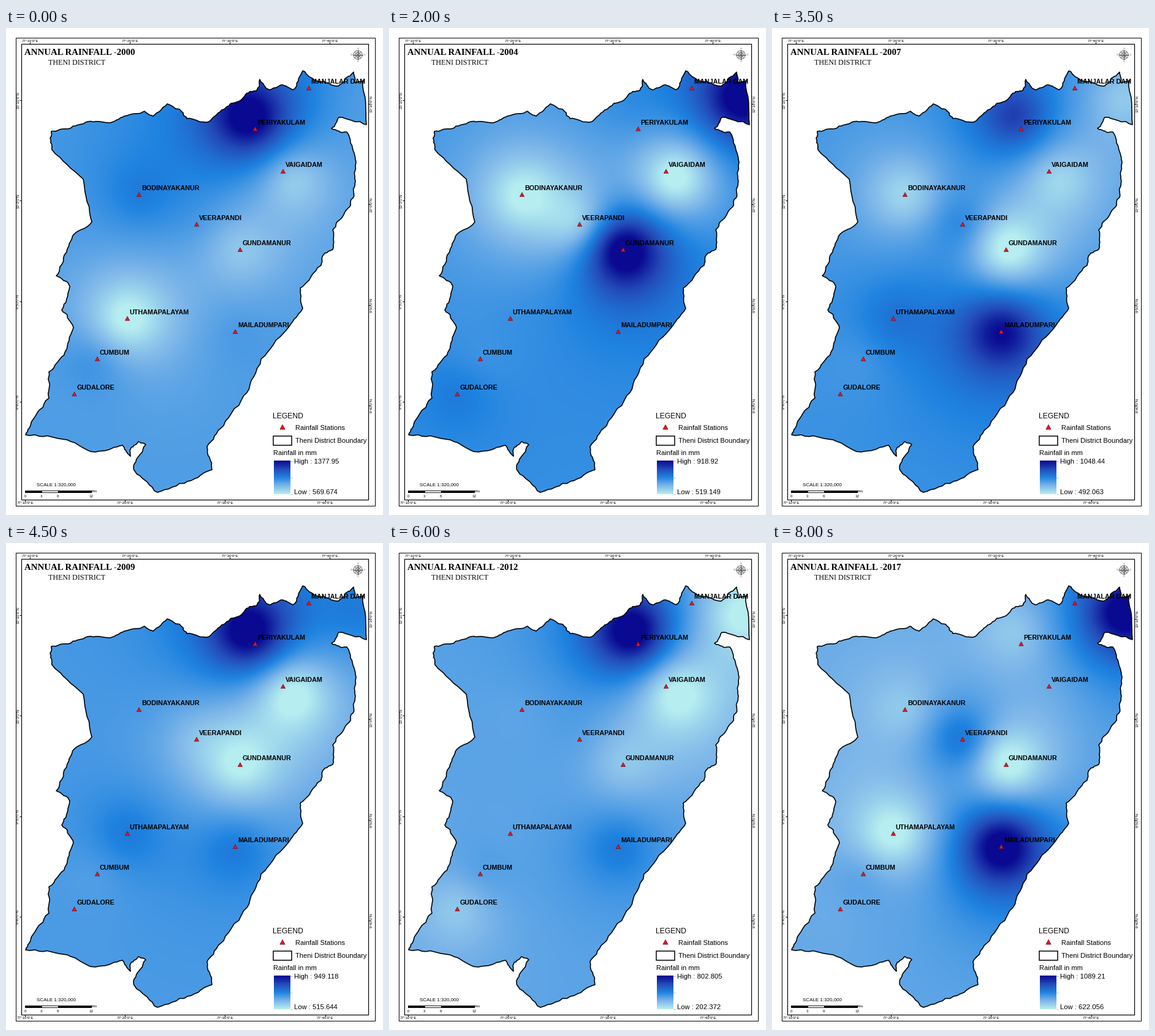
Animation of 615 by 796 pixels, one loop 8.5 s. Source, as a matplotlib script:

```python
import numpy as np
import matplotlib.pyplot as plt
from matplotlib.animation import FuncAnimation
from matplotlib.colors import LinearSegmentedColormap
from matplotlib.patches import Circle, Polygon, Rectangle
from matplotlib.path import Path

W, H = 615, 796
PT = 0.72  # points per pixel at 100 dpi
SANS, SERIF = "Liberation Sans", "Liberation Serif"
YEARS = [*range(2000, 2016), 2017]

STATIONS = {
    "MANJALAR DAM": (494, 98.5),
    "PERIYAKULAM": (406.5, 165),
    "VAIGAIDAM": (452, 234.5),
    "BODINAYAKANUR": (217, 272.5),
    "VEERAPANDI": (311, 321),
    "GUNDAMANUR": (382, 362.5),
    "UTHAMAPALAYAM": (198, 475),
    "MAILADUMPARI": (374, 496.5),
    "CUMBUM": (149, 541),
    "GUDALORE": (111.5, 598.5),
}
# Gauges that stand away from their marker
GAUGES = STATIONS | {"MANJALAR DAM": (574, 115), "PERIYAKULAM": (396, 146),
                     "VAIGAIDAM": (467, 245)}

# Relative rainfall of each kind of gauge; the others get the year's base level
KINDS = {"soaked": 1.12, "damp": 0.53, "dry": 0.17, "parched": -0.04}


def survey(high, low, base, **kinds):
    """Totals in mm and the level of every gauge, named by its first letters."""
    levels = [next((KINDS[k] for k, names in kinds.items()
                    if name[:4] in names.split()), base) for name in GAUGES]
    return [high, low, base, *levels]


# Other years are blended between these.
SURVEYS = {
    2000: survey(1377.95, 569.674, .38, soaked="PERI", damp="BODI",
                 dry="VAIG GUND", parched="UTHA"),
    2002: survey(1193.09, 487.577, .30, soaked="PERI", damp="GUND",
                 dry="BODI CUMB", parched="VAIG VEER"),
    2004: survey(918.92, 519.149, .43, soaked="GUND MANJ", damp="MAIL GUDA",
                 dry="VEER", parched="BODI VAIG"),
    2006: survey(1098.1, 480.273, .39, soaked="MAIL", damp="PERI VEER UTHA",
                 dry="VAIG", parched="MANJ BODI GUND"),
    2009: survey(949.118, 515.644, .38, soaked="PERI", damp="MANJ UTHA MAIL",
                 dry="VEER", parched="VAIG GUND"),
    2012: survey(802.805, 202.372, .34, soaked="PERI", damp="MAIL",
                 dry="GUND GUDA", parched="MANJ VAIG"),
    2017: survey(1089.21, 622.056, .31, soaked="MAIL MANJ", damp="VEER",
                 dry="BODI PERI", parched="UTHA GUND"),
}

# Main corners of the district, clockwise from the north-west
CORNERS = [
    (72, 180), (74, 169), (100, 165), (133, 153), (170, 155), (193, 144),
    (226, 136), (240, 144), (263, 124), (287, 137), (295, 148), (331, 153),
    (355, 133), (367, 123), (386, 115), (397, 104), (410, 101), (414, 84),
    (430, 101), (449, 93), (468, 101), (484, 70), (504, 86), (541, 95),
    (552, 86), (567, 72), (568, 89), (583, 86), (588, 158), (543, 146),
    (531, 164), (556, 170), (570, 215), (570, 250), (566, 278), (551, 305),
    (533, 330), (533, 362), (520, 368), (514, 388), (480, 425), (484, 458),
    (457, 494), (416, 541), (393, 596), (355, 650), (328, 684), (336, 722),
    (296, 741), (247, 759), (210, 724), (209, 713), (228, 681), (216, 676),
    (204, 686), (203, 700), (190, 682), (146, 693), (92, 672), (32, 665),
    (44, 640), (70, 605), (70, 562), (96, 530), (110, 490), (91, 461),
    (104, 422), (82, 405), (99, 366), (110, 338), (140, 317), (126, 247),
    (75, 199),
]

# Light cyan to navy, with the in-between stops of a perceptual blend
RAMP = LinearSegmentedColormap.from_list(
    "rain", ["#b6edf0", "#7db6e9", "#1f83e0", "#234ab8", "#090991"], N=512)


def roughen(points, rounds=3, size=1.8, seed=4):
    """Repeatedly add a slightly displaced point in the middle of each side."""
    rng = np.random.default_rng(seed)
    pts = np.array(points, float)
    for _ in range(rounds):
        step = np.roll(pts, -1, axis=0) - pts
        reach = np.minimum(size, 0.15 * np.hypot(*step.T))[:, None]
        mids = pts + step / 2 + reach * rng.uniform(-1, 1, pts.shape)
        pts = np.stack([pts, mids], axis=1).reshape(-1, 2)
    return pts


SITES = np.array(list(GAUGES.values()))


def kernel(x, y, spread=65):
    d2 = (x[..., None] - SITES[:, 0])**2 + (y[..., None] - SITES[:, 1])**2
    return 1 / (1 + d2 / spread**2)


outline = roughen(CORNERS)
gx, gy = np.meshgrid(np.arange(1, W, 2), np.arange(1, H, 2))
BASIS = kernel(gx, gy)
SOLVE = np.linalg.inv(kernel(*SITES.T))
INSIDE = Path(outline).contains_points(
    np.c_[gx.ravel(), gy.ravel()]).reshape(gx.shape)


def rainfall(base, levels):
    """Smooth surface through all gauges, stretched to the range 0 to 1."""
    field = np.clip(base + BASIS @ (SOLVE @ (levels - base)), 0, 1)
    low, high = field[INSIDE].min(), field[INSIDE].max()
    return (field - low) / (high - low)


def year_data(year):
    rows = np.array(list(SURVEYS.values())).T
    high, low, base, *levels = (np.interp(year, list(SURVEYS), r) for r in rows)
    return high, low, rainfall(base, np.array(levels))


fig = plt.figure(figsize=(W / 100, H / 100), dpi=100, facecolor="white")
ax = fig.add_axes([0, 0, 1, 1])


def text(x, cy, s, px, font=SANS, **kw):
    """Text whose capitals are centred on cy."""
    return ax.text(x, cy + 0.36 * px, s, fontsize=px * PT, family=font,
                   va="baseline", **kw)


def line(x, y, width=1.0, color="black"):
    ax.plot(x, y, color=color, lw=width * PT, solid_capstyle="butt")


def box(x0, y0, x1, y1, width=1.0, fill="none"):
    ax.add_patch(Rectangle((x0, y0), x1 - x0, y1 - y0, fc=fill, ec="black",
                           lw=width * PT))


def triangle(x, y, r):
    ax.add_patch(Polygon([(x - r, y + r * .85), (x + r, y + r * .85),
                          (x, y - r)], fc="#e8141c", ec="#5a1020",
                         lw=0.6 * PT, zorder=5))


def draw_frame():
    box(15.5, 16, 602, 781, 1.0)
    box(25, 26, 590.5, 770.5, 1.2)
    for i in range(4):
        east = f"77°{10 * (i + 1)}'0\"E"
        degrees, minutes = divmod(610 - 10 * i, 60)
        north = f"{degrees}°{minutes}'0\"N"
        top, bottom = 39 + 163 * i, 31 + 163.2 * i
        left, right = 118 + 164.4 * i, 124 + 164.4 * i
        text(top, 20.5, east, 6.3, ha="center")
        text(bottom, 776, east, 6.3, ha="center")
        line([top] * 2, [23, 26])
        line([bottom] * 2, [770.5, 773.5])
        for x, y in ((19.5, left), (596, right)):
            ax.text(x, y, north, fontsize=6.3 * PT, family=SANS, rotation=90,
                    ha="center", va="center")
        line([22, 25], [left] * 2)
        line([590.5, 593.5], [right] * 2)


def draw_compass(x=574, y=44):
    for r in (7, 4):
        ax.add_patch(Circle((x, y), r, fc="none", ec="#444444", lw=0.8 * PT))
    for k, s in enumerate("ESWN"):
        c, d = np.cos(k * np.pi / 2), np.sin(k * np.pi / 2)
        line([x, x + 8 * c], [y, y + 8 * d], 1.2, "#444444")
        line([x, x + 4.5 * (c - d)], [y, y + 4.5 * (c + d)], 0.8, "#666666")
        text(x + 10.5 * c, y + 10.5 * d, s, 4, ha="center", color="#777777")


def draw_legend():
    text(435, 633.5, "LEGEND", 12.1)
    triangle(451, 652.5, 4.2)
    text(472, 653, "Rainfall Stations", 11.1)
    box(436, 667, 466, 682, 1.5, "white")
    text(472, 674.5, "Theni District Boundary", 11.1)
    text(436, 694.5, "Rainfall in mm", 11.1)
    ax.imshow(np.linspace(1, 0, 110)[:, None], cmap=RAMP, vmin=0, vmax=1,
              extent=(436.5, 463.5, 762, 707), aspect="auto")
    for y in (707.5, 734.5, 761.5):
        line([463.5, 466.5], [y] * 2, 0.8, "#9aa6b4")


def draw_scale(x0=31, km=8.96):
    text(82, 745, "SCALE 1:320,000", 8.0, ha="center")
    for a, b, fill in ((0, 3, "black"), (3, 6, "white"), (6, 12, "black")):
        box(x0 + a * km, 755.8, x0 + b * km, 759, 0.9, fill)
    for k in (0, 3, 6, 12):
        text(x0 + k * km, 764.5, str(k), 6.3, ha="center")
    text(140, 757, "Km", 6.3)


field_image = ax.imshow(np.zeros_like(gx), cmap=RAMP, vmin=0, vmax=1,
                        extent=(0, W, H, 0), interpolation="bilinear",
                        aspect="auto", zorder=1)
border = Polygon(outline, fc="none", ec="black", lw=1.6 * PT,
                 joinstyle="round", zorder=3)
ax.add_patch(border)
field_image.set_clip_path(border)

draw_frame()
draw_compass()
draw_legend()
draw_scale()
for name, (sx, sy) in STATIONS.items():
    triangle(sx, sy, 3.7)
    text(sx + 3.8, sy - 11, name, 10.8, weight="bold", zorder=6)

title = text(30, 39, "", 14.9, SERIF, weight="bold")
text(69, 55.5, "THENI DISTRICT", 12, SERIF)
high_label = text(470, 708, "", 11.2)
low_label = text(470, 758, "", 11.2)

ax.set_xlim(0, W)
ax.set_ylim(H, 0)
ax.axis("off")


def draw(i):
    high, low, field = year_data(YEARS[i])
    field_image.set_data(field)
    title.set_text(f"ANNUAL RAINFALL -{YEARS[i]}")
    high_label.set_text(f"High : {high:.6g}")
    low_label.set_text(f"Low : {low:.6g}")
    return field_image, title, high_label, low_label


anim = FuncAnimation(fig, draw, frames=len(YEARS), interval=500, repeat=True)
plt.show()
```
